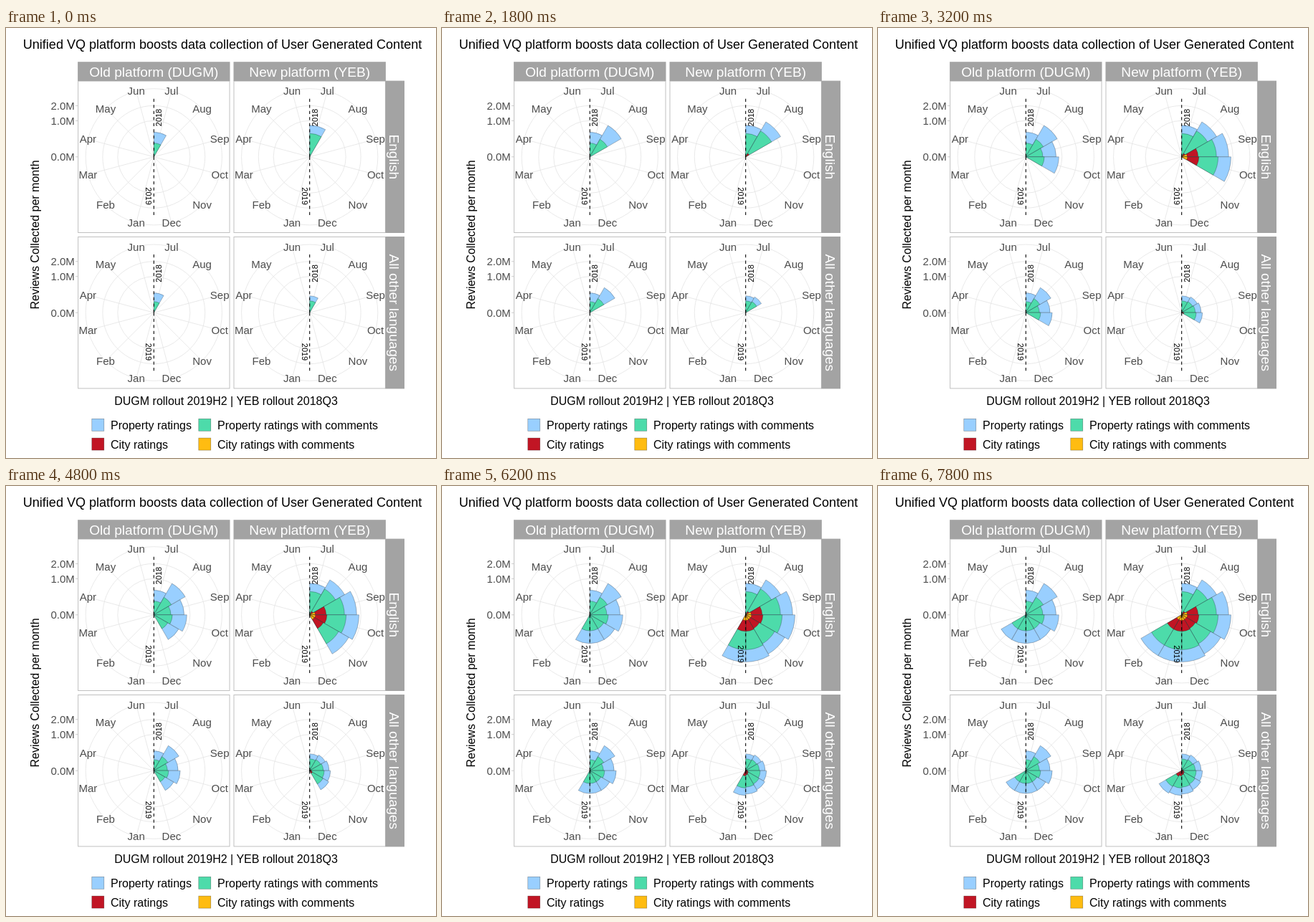
An HTML page that plays this animation: 600x600 px, repeating every 8 s.

```html
<!DOCTYPE html>
<html lang="en">
<head>
<meta charset="utf-8">
<title>Reviews collected per month</title>
<style>
  html, body { margin: 0; width: 100%; height: 100%; overflow: hidden; background: #fff; }
  svg { display: block; width: 100vw; height: 100vh; }
  text { font-family: "Liberation Sans", Arial, Helvetica, sans-serif; }
</style>
</head>
<body>
<svg id="stage" viewBox="0 0 600 600" xmlns="http://www.w3.org/2000/svg"></svg>
<script>
const STEP = 1000, COUNT = 8, LOOP = STEP * COUNT;
const PANEL = 211.4, HALF = PANEL / 2, PITCH = 217.4, LEFT = 100.6, TOP = 74.1;
const RIM = 0.45 * PANEL, REACH = 0.4 * PANEL;
const UNIT = 50.5; // radius of one million on a square-root scale
const MONTHS = 'Jul Aug Sep Oct Nov Dec Jan Feb Mar Apr May Jun'.split(' ');
const COLORS = ['#99cfff', '#4ddbaa', '#c11524', '#ffbc11'];
const EDGE = { stroke: '#000', 'stroke-opacity': .42, 'stroke-width': .6 };
const GRAY = '#a3a3a3', DARK = '#4d4d4d', LINE = '#c0c0c0';

// The first months vary, then the radius settles at a steady level.
const settle = (first, level) => m => first[m] ?? level;
const oldTotal = settle([34.5, 50.5, 42.3, 46], 39.9);
const newTotal = settle([44, 56.4, 65.6, 68.8, 63], 65.7);

// total: outer radius in month m; the other values are shares of that radius
const PANELS = [
  { col: 0, row: 0, total: oldTotal, comments: .56 },
  { col: 1, row: 0, total: newTotal, comments: .74, city: m => Math.min(.1 * m * m, .35), cityComments: .13 },
  { col: 0, row: 1, total: m => .8 * oldTotal(m), comments: .56 },
  { col: 1, row: 1, total: m => 23.5 + 1.85 * m, comments: .7, city: m => .035 * m }
];

const svg = document.getElementById('stage');
const months = Array.from({ length: COUNT }, () => []);

function add(parent, tag, attrs, content) {
  const el = document.createElementNS('http://www.w3.org/2000/svg', tag);
  for (const key in attrs) el.setAttribute(key, attrs[key]);
  if (content) el.textContent = content;
  parent.appendChild(el);
  return el;
}

function label(parent, content, x, y, size, fill = '#000', anchor = 'middle', turn = 0) {
  return add(parent, 'text', {
    'font-size': size, fill, 'text-anchor': anchor,
    transform: `translate(${x} ${y}) rotate(${turn})`
  }, content);
}

function polar(r, deg) {
  const a = deg * Math.PI / 180;
  return [r * Math.sin(a), -r * Math.cos(a)];
}

function wedge(r, month) {
  return `M0 0L${polar(r, month * 30)}A${r} ${r} 0 0 1 ${polar(r, month * 30 + 30)}Z`;
}

function radii({ total, comments, city = () => 0, cityComments = 0 }, m) {
  const share = city(m);
  return [1, comments, share, Math.min(cityComments, share / 3)].map(s => s * total(m));
}

function drawPanel(panel) {
  const g = add(svg, 'g', {
    transform: `translate(${LEFT + HALF + panel.col * PITCH} ${TOP + HALF + panel.row * PITCH})`
  });
  const grid = add(g, 'g', { fill: 'none', stroke: '#e4e4e4', 'stroke-width': .8 });
  for (const r of [UNIT, UNIT * Math.SQRT2, RIM]) add(grid, 'circle', { r });
  MONTHS.forEach((_, i) => add(grid, 'path', { d: `M0 0L${polar(RIM, i * 30 + 15)}` }));

  months.forEach((groups, m) => {
    const group = add(g, 'g', EDGE);
    radii(panel, m).forEach((r, k) => {
      if (r > 0) add(group, 'path', { d: wedge(r, m), fill: COLORS[k] });
    });
    groups.push(group);
  });

  for (const [side, year] of [[-1, '2018'], [1, '2019']]) {
    add(g, 'path', {
      d: `M0 0V${side * REACH}`, stroke: '#000', 'stroke-width': 1.07, 'stroke-dasharray': 4.27
    });
    label(g, year, -11 * side, 54.8 * side, 11, '#000', 'middle', 90 * side);
  }
  MONTHS.forEach((name, i) => {
    const [x, y] = polar(RIM, i * 30 + 15);
    label(g, name, x, y + 5.3, 15, DARK);
  });
  add(g, 'rect', { x: -HALF, y: -HALF, width: PANEL, height: PANEL, fill: 'none', stroke: LINE });
}

function drawStrips() {
  ['Old platform (DUGM)', 'New platform (YEB)'].forEach((name, i) => {
    const x = LEFT + i * PITCH;
    add(svg, 'rect', { x: x - .5, y: 47.2, width: PANEL + 1, height: 26.8, fill: GRAY });
    label(svg, name, x + HALF, 68.3, 19.1, '#fff');
  });
  ['English', 'All other languages'].forEach((name, i) => {
    const y = TOP + i * PITCH;
    add(svg, 'rect', { x: 529.4, y: y - .5, width: 26.6, height: PANEL + 1, fill: GRAY });
    label(svg, name, 535.2, y + HALF, 19.1, '#fff', 'middle', 90);
  });
}

function drawAxes() {
  for (let row = 0; row < 2; row++) {
    for (let m = 0; m < 3; m++) {
      const y = TOP + HALF + row * PITCH - UNIT * Math.sqrt(m);
      label(svg, m + '.0M', 95.8, y + 5.3, 15, DARK, 'end');
      add(svg, 'path', { d: `M97 ${y}H100.5`, stroke: LINE, 'stroke-width': .8 });
    }
  }
  label(svg, 'Reviews Collected per month', 46, 288.5, 16, '#000', 'middle', -90);
  label(svg, 'DUGM rollout 2019H2 | YEB rollout 2018Q3', 307, 526, 16);
}

function drawLegend() {
  const names = ['Property ratings', 'Property ratings with comments',
    'City ratings', 'City ratings with comments'];
  names.forEach((name, i) => {
    const x = 119.8 + (i % 2) * 149, y = 545.3 + (i >> 1) * 26.8;
    add(svg, 'rect', { x, y, width: 17, height: 17, fill: COLORS[i], ...EDGE });
    label(svg, name, x + 26.2, y + 14.5, 16, '#000', 'start');
  });
}

label(svg, 'Unified VQ platform boosts data collection of User Generated Content', 302, 29, 18);
PANELS.forEach(drawPanel);
drawStrips();
drawAxes();
drawLegend();

function update(time) {
  const last = Math.floor((time % LOOP) / STEP);
  months.forEach((groups, m) => groups.forEach(group =>
    group.setAttribute('visibility', m <= last ? 'visible' : 'hidden')));
}

const start = performance.now();
function tick() {
  update(performance.now() - start);
  requestAnimationFrame(tick);
}
tick();
</script>
</body>
</html>
```
